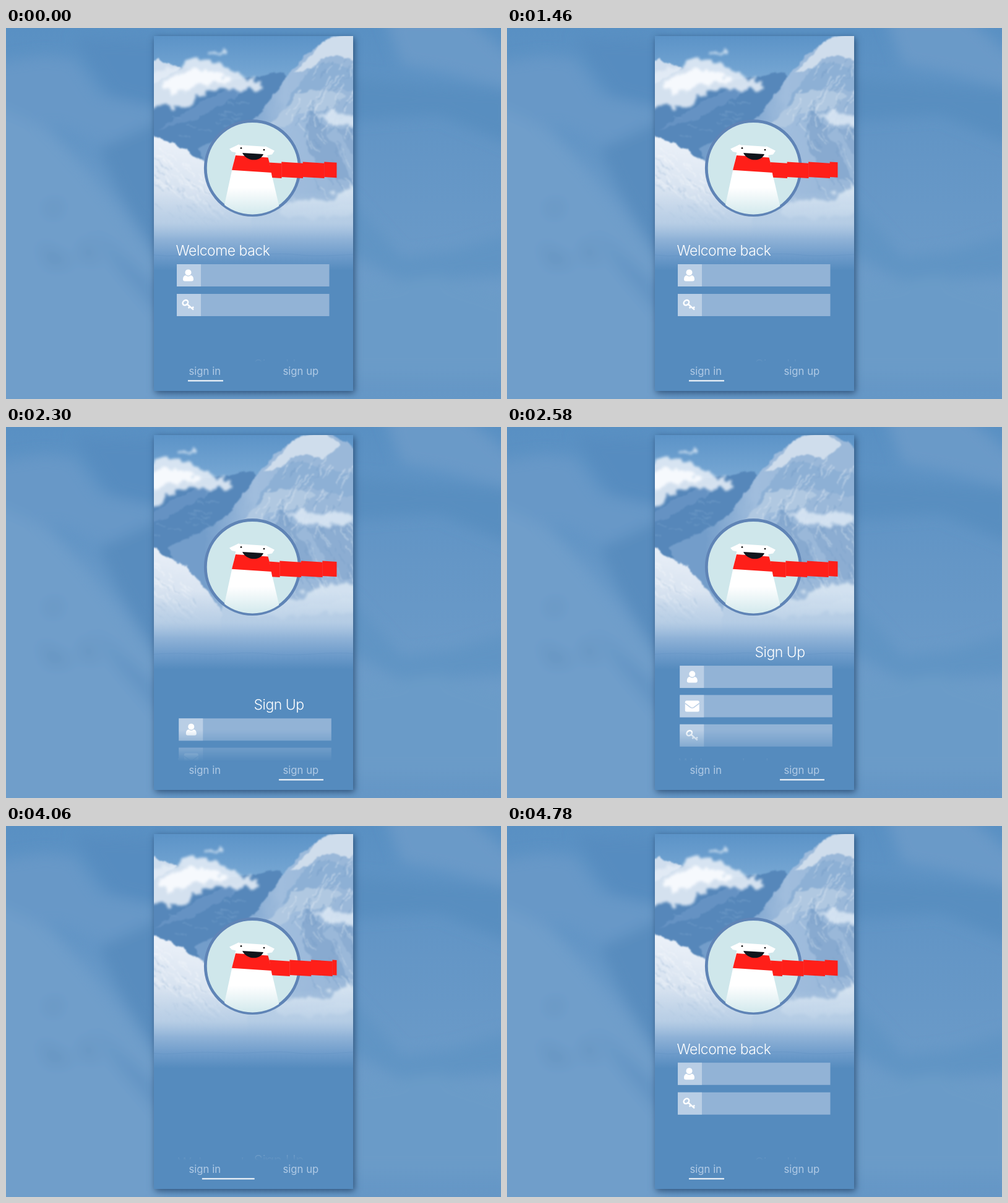
Animation, 800 px wide and 600 px high, one loop 4.8 s. Source, as an HTML page:

```html
<!DOCTYPE html>
<html lang="en">
<head>
<meta charset="utf-8">
<title>Sign in / sign up</title>
<style>
  html, body { margin: 0; width: 100%; height: 100%; overflow: hidden; background: #6698c8; }
  svg { position: absolute; left: 0; top: 0; width: 800px; height: 600px; }
  #panel, #shadow { position: absolute; left: 238.5px; top: 13px; width: 322.5px; height: 573.5px; }
  #panel { overflow: hidden; background: #558bbe; }
  #shadow { box-shadow: 2px 3px 10px rgba(20, 48, 84, .68); }
  #panel svg { left: -238.5px; top: -13px; overflow: visible; }
  #photo { will-change: transform; }
  .title { font: 300 23px Inter, sans-serif; letter-spacing: -.5px; fill: #fff; }
  .tab { font: 400 16.7px Inter, sans-serif; fill: #b0cae5; }
</style>
</head>
<body>
<svg viewBox="0 0 800 600">
  <defs>
    <filter id="soft" x="-20%" y="-20%" width="140%" height="140%"><feGaussianBlur stdDeviation="11"/></filter>
    <linearGradient id="wall" x2="0" y2="1">
      <stop stop-color="#5990c3"/><stop offset=".35" stop-color="#6496c6"/>
      <stop offset=".75" stop-color="#6d9cc9"/><stop offset="1" stop-color="#6597c6"/>
    </linearGradient>
  </defs>
  <rect width="800" height="600" fill="url(#wall)"/>
  <g filter="url(#soft)">
    <path d="M-30 60L60 45L110 50L150 110L245 130V190L160 190L90 160L-30 150Z" fill="#6798c7"/>
    <path d="M110 15L260 20V130L170 110Z" fill="#568cc0"/>
    <path d="M-30 120L70 165L130 230L250 380V620H-30Z" fill="#709eca"/>
    <path d="M150 195L250 150V380L180 260Z" fill="#588cbe"/>
    <path d="M140 330L250 420V470L190 400Z" fill="#6394c4"/>
    <path d="M610 -20L740 -20L820 50V100L700 70L640 60Z" fill="#6a9ac8"/>
    <path d="M550 80L660 90L820 100V190L700 140L550 150Z" fill="#598ec0"/>
    <path d="M550 270L640 370L720 360L820 330V400L640 410L550 360Z" fill="#6094c4"/>
    <path d="M550 420L700 400L820 440V560L550 560Z" fill="#6b9bc8"/>
    <path d="M60 290L90 280L80 305ZM55 350L110 380L70 385ZM130 340L150 380L120 370Z" fill="#6593c0"/>
  </g>
</svg>

<div id="shadow"></div>
<div id="panel">
  <svg id="photo" viewBox="0 0 800 600">
    <defs>
      <linearGradient id="sky" x2="0" y2="1">
        <stop stop-color="#568fc5"/><stop offset="1" stop-color="#8fb9de"/>
      </linearGradient>
      <linearGradient id="slope" gradientUnits="userSpaceOnUse" x1="370" y1="130" x2="530" y2="130">
        <stop stop-color="#739dca"/><stop offset=".5" stop-color="#a0bddd"/><stop offset="1" stop-color="#9ab8d9"/>
      </linearGradient>
      <linearGradient id="snowfield" gradientUnits="userSpaceOnUse" x1="290" y1="190" x2="270" y2="310">
        <stop stop-color="#eaf0f8"/><stop offset="1" stop-color="#cbdaeb"/>
      </linearGradient>
      <linearGradient id="haze" gradientUnits="userSpaceOnUse" x1="0" y1="265" x2="0" y2="392">
        <stop stop-color="#b9cfe6" stop-opacity="0"/><stop offset=".4" stop-color="#b3cbe4" stop-opacity=".85"/>
        <stop offset=".6" stop-color="#8fb2d7"/><stop offset=".82" stop-color="#6d9bca"/>
        <stop offset="1" stop-color="#558bbe"/>
      </linearGradient>
      <filter id="rough" filterUnits="userSpaceOnUse" x="200" y="-20" width="460" height="440" color-interpolation-filters="sRGB">
        <feTurbulence type="fractalNoise" baseFrequency=".06" numOctaves="4" seed="4"/>
        <feDisplacementMap in="SourceGraphic" scale="11" xChannelSelector="R" yChannelSelector="G"/>
        <feGaussianBlur stdDeviation=".9"/>
      </filter>
      <filter id="puff" filterUnits="userSpaceOnUse" x="200" y="-20" width="460" height="440" color-interpolation-filters="sRGB">
        <feTurbulence type="fractalNoise" baseFrequency=".07" numOctaves="4" seed="9"/>
        <feDisplacementMap in="SourceGraphic" scale="22" xChannelSelector="R" yChannelSelector="G"/>
        <feGaussianBlur stdDeviation="2.2"/>
      </filter>
    </defs>
    <rect x="200" width="450" height="140" fill="url(#sky)"/>
    <g filter="url(#rough)">
      <path d="M210 62L245 52L290 64L340 85L385 82L450 70L500 160L360 320H210Z" fill="#5687ba"/>
      <path d="M210 58L245 50L285 64L262 78L210 100Z" fill="#d0deee"/>
      <path d="M340 105L400 85L380 108L300 150L245 165L300 130Z" fill="#6592c3"/>
      <path d="M310 195L370 165L410 140L456 76L484 44L513 23L532 12L565 5L650 60V340H380Z" fill="url(#slope)"/>
      <path d="M513 22L532 12L562 8L590 30L560 52L525 42L490 66L465 74Z" fill="#cfddec"/>
      <path d="M490 66L525 55L560 68L650 80V125L565 105L515 92L475 118L450 125Z" fill="#8db0d5"/>
      <path d="M470 108L510 98L550 110L525 130L475 138L450 162L425 158Z" fill="#b0c8e1"/>
      <path d="M490 135L515 160L540 205L560 250L510 235L485 190Z" fill="#88aad0"/>
      <path d="M535 165L650 150V260L580 240Z" fill="#8cadd2"/>
      <g id="streaks" fill="none" stroke-width="1.8"></g>
      <path d="M210 160L239 173L270 186L305 206L340 226L400 300L470 350H210Z" fill="url(#snowfield)"/>
      <g id="snow" fill="none" stroke-width="1.4"></g>
      <path d="M400 285L470 300L650 270V360H390Z" fill="#bcd1e7"/>
    </g>
    <g filter="url(#puff)">
      <path d="M215 78L250 68L285 62L300 48L335 52L362 64L382 82L412 86L416 98L390 102L350 98L312 106L298 128L275 130L255 122L215 138Z" fill="#e3ecf6" fill-opacity=".9"/>
      <path d="M328 38h26v6h-26Z" fill="#c9dcee"/>
      <path d="M250 88L300 66L345 72L365 88L310 92L265 106Z" fill="#f6f9fd"/>
      <path d="M504 140L525 134L545 142L575 136L606 140L608 156L560 160L528 156Z" fill="#d9e6f3" fill-opacity=".9"/>
      <path d="M452 282L490 275L520 278L545 258L600 252L650 260V300L560 302L500 308L440 304Z" fill="#d9e6f2" fill-opacity=".9"/>
    </g>
    <rect x="200" y="260" width="450" height="140" fill="url(#haze)"/>
    <path d="M200 369q20 -5 40 -2t40 1t45 -2t40 1t50 -1t60 1t70 0t70 0" fill="none" stroke="#5f90c2" stroke-opacity=".45"/>
    <rect x="200" y="392" width="450" height="210" fill="#558bbe"/>
  </svg>
</div>

<svg viewBox="0 0 800 600">
  <defs>
    <linearGradient id="fade" gradientUnits="userSpaceOnUse" x1="0" y1="490" x2="0" y2="541">
      <stop stop-color="#fff"/><stop offset="1" stop-color="#fff" stop-opacity="0"/>
    </linearGradient>
    <mask id="fadeOut" maskUnits="userSpaceOnUse" x="239" y="300" width="322" height="286">
      <rect x="239" y="300" width="322" height="286" fill="url(#fade)"/>
    </mask>
    <linearGradient id="fur" gradientUnits="userSpaceOnUse" x1="0" y1="258" x2="0" y2="298">
      <stop stop-color="#fff"/><stop offset="1" stop-color="#d6ebee"/>
    </linearGradient>
    <clipPath id="round"><circle cx="398.3" cy="226.5" r="75"/></clipPath>
    <clipPath id="tailEnd"><path d="M425 214H534.5V246H431Z"/></clipPath>
    <g id="user"><circle cy="-4.6" r="5"/>
      <path d="M-4 0Q0 3.4 4 0Q8.500 .5 8.500 6.500Q8.500 9.500 5.500 9.500H-5.500Q-8.500 9.500 -8.500 6.500Q-8.500 .5 -4 0Z"/></g>
    <g id="mail"><rect x="-11.5" y="-9" width="23" height="18" rx="2.5"/>
      <path d="M-11.5 -4.5L-2.5 2.2Q0 3.6 2.5 2.2L11.5 -4.5" fill="none" stroke="#b9cee5" stroke-width="1.4"/></g>
    <g id="key" fill="none" stroke="#fff" stroke-width="2.5">
      <ellipse cx="-4.6" cy="-3.8" rx="4.6" ry="3.7" transform="rotate(-40 -4.6 -3.8)"/>
      <path d="M-1.6 -1.2L8.5 7.6M2.6 2.6L.2 5.2M6 5.6L8.6 2.8"/></g>
  </defs>

  <circle cx="398.3" cy="226.5" r="76" fill="#cfe7eb" stroke="#5f84b6" stroke-width="4.800"/>
  <g clip-path="url(#round)">
    <path d="M374 189L421 192L422 205L443 295V305H350V300Z" fill="url(#fur)"/>
    <path d="M377 188L361 195.5L365 200L374 202ZM419 191L434 198.5L430 204.5L421 206Z" fill="#fff"/>
  </g>
  <path d="M371 206L423.5 209.5L430 234L365 229.700Z" fill="#ff1f19"/>
  <path d="M382 202L416 204C411 217 389 216.500 382 202Z" fill="#10151c"/>
  <circle cx="380" cy="194.2" r="1.3"/><circle cx="417" cy="197" r="1.3"/>
  <g clip-path="url(#tailEnd)"><g id="tail" fill="#ff1f19"></g></g>

  <g mask="url(#fadeOut)">
    <g id="signIn"><text class="title" x="274.5" y="368">Welcome back</text></g>
    <g id="signUp"><text class="title" x="400.5" y="368">Sign Up</text></g>
  </g>
  <text class="tab" x="295.5" y="561">sign in</text>
  <text class="tab" x="447.5" y="561">sign up</text>
  <rect id="line" y="569.5" height="2" fill="#fff"/>
</svg>

<script>
const $ = id => document.getElementById(id);
const LOOP = 4800, TAIL_STEP = 34.5, TAIL_TIME = 1200, DROP = 185;

let seed = 7;
const random = () => (seed = seed * 16807 % 2147483647) / 2147483647;

// Short strokes scattered over the parallelogram at (x, y) spanned by a and b.
function strokes(id, color, count, [x, y], a, b, [dx, dy]) {
  let d = '';
  for (let i = 0; i < count; i++) {
    const u = random(), v = random(), k = .4 + random();
    d += `M${x + u * a[0] + v * b[0]} ${y + u * a[1] + v * b[1]}l${dx * k} ${dy * k}`;
  }
  $(id).innerHTML += `<path d="${d}" stroke="${color}" stroke-opacity=".5"/>`;
}
strokes('streaks', '#dfe9f4', 50, [515, 30], [110, 30], [-60, 110], [-9, 14]);
strokes('streaks', '#789fca', 40, [515, 40], [110, 30], [-60, 110], [-7, 12]);
strokes('streaks', '#d0dfee', 45, [465, 140], [150, 10], [30, 125], [9, 16]);
strokes('streaks', '#7a9fc9', 40, [470, 140], [150, 10], [30, 115], [8, 15]);
strokes('streaks', '#759fcb', 20, [250, 140], [120, -35], [30, 40], [16, 3]);
strokes('snow', '#f9fbfd', 50, [239, 185], [110, 70], [0, 60], [14, 12]);
strokes('snow', '#a4bdd9', 50, [239, 205], [120, 75], [0, 80], [9, 9]);

function addField(form, x, y, icon) {
  $(form).innerHTML += `<rect x="${x}" y="${y}" width="246.5" height="36" fill="#92b3d6"/>
    <rect x="${x}" y="${y}" width="39" height="36" fill="#b9cee5"/>
    <use href="#${icon}" x="${x + (form === 'signIn' ? 18.5 : 20)}" y="${y + 18}" fill="#fff"/>`;
}
['user', 'key'].forEach((icon, i) => addField('signIn', 276, 382 + 48 * i, icon));
['user', 'mail', 'key'].forEach((icon, i) => addField('signUp', 279.3, 382.3 + 47.4 * i, icon));

for (let i = -2; i < 3; i++) {
  const x = 445.2 + TAIL_STEP * i, end = x + TAIL_STEP + .3;
  $('tail').innerHTML += `<path d="M${x} 216.5L${end} 218.7V243L${x} 241Z"/>`;
}

const progress = (t, start, time) => Math.min(1, Math.max(0, (t - start) / time));
const sine = (...span) => (1 - Math.cos(Math.PI * progress(...span))) / 2;
const cubic = (...span) => 1 - (1 - progress(...span)) ** 3;
const move = (id, x, y) => $(id).setAttribute('transform', `translate(${x} ${y})`);

function draw() {
  const t = performance.now() % LOOP;
  const hidden = sine(t, 1490, 500) - sine(t, 4095, 715);
  const shown = sine(t, 1940, 705) - sine(t, 3610, 500);
  move('signIn', 3 * hidden, DROP * hidden);
  move('signUp', 0, DROP * (1 - shown));
  move('tail', TAIL_STEP * (t / TAIL_TIME % 1), 0);

  const pan = cubic(t, 1645, 550) - cubic(t, 3785, 550);
  $('photo').style.transform = `translateX(${-49 * pan}px)`;

  const left = 294 + 147 * (cubic(t, 1725, 610) - cubic(t, 3785, 597));
  const right = 351 + 162 * (cubic(t, 1645, 507) - cubic(t, 3865, 610));
  $('line').setAttribute('x', left);
  $('line').setAttribute('width', right - left);
  requestAnimationFrame(draw);
}
draw();
</script>
</body>
</html>
```
